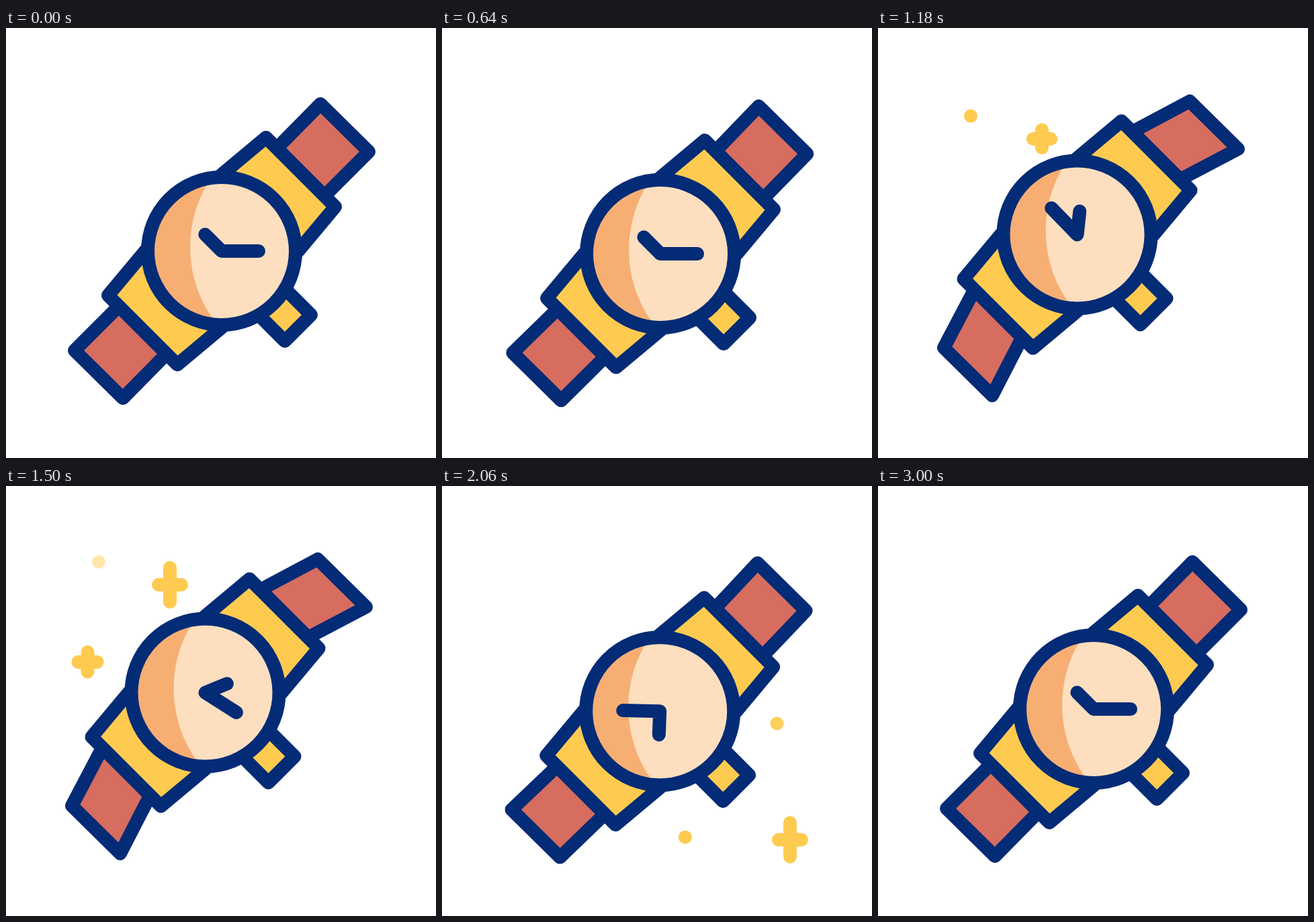
Recreate the animation shown at these times as an HTML page with a canvas. Size 640x640 px, loop 3.6 s.

```html
<!DOCTYPE html>
<html lang="en">
<head>
<meta charset="utf-8">
<title>Wrist watch</title>
<style>
html, body { margin: 0; width: 100%; height: 100%; overflow: hidden; background: #fff; }
canvas { display: block; }
</style>
</head>
<body>
<canvas id="stage" width="640" height="640"></canvas>
<script>
const ctx = document.getElementById('stage').getContext('2d');
const LOOP = 3600;
const NAVY = '#042b76', RED = '#d66d5f', YELLOW = '#fecb50', LIGHT = '#fddfbf', ORANGE = '#f7ae73';

// Smooth curve through [time, value] keys that never overshoots; flat at turning points.
function track(...keys) {
  const rise = keys.slice(1).map(([t, v], i) => (v - keys[i][1]) / (t - keys[i][0]));
  const slope = keys.map((_, i) => {
    const a = rise[i - 1] || 0, b = rise[i] || 0;
    return a * b > 0 ? 2 * a * b / (a + b) : 0;
  });
  return t => {
    if (t <= keys[0][0]) return keys[0][1];
    const i = keys.findIndex(k => k[0] > t) - 1;
    if (i < 0) return keys[keys.length - 1][1];
    const [t0, v0] = keys[i], [t1, v1] = keys[i + 1], d = t1 - t0, u = (t - t0) / d;
    const s = u * u * (3 - 2 * u);
    return v0 + (v1 - v0) * s + d * u * (1 - u) * (slope[i] * (1 - u) - slope[i + 1] * u);
  };
}

// Diagonal shifts, in px along both axes
const bodyShift = track([400, 0], [550, 8], [860, -16], [1040, -24.5], [1500, -24.5], [1800, 8.3], [1870, 12], [2160, 0]);
const tipShift = track([400, 0], [550, 4], [860, -0.5], [1100, -4], [1500, -4], [1800, 4.8], [1870, 6], [2160, 0]);
const crownShift = track([0, 0], [400, -9], [600, 0]);

// Hand angles in degrees
const hourTurn = track([640, -135], [860, -127], [1500, -22.4], [1800, 36], [2440, 165], [3000, 225]);
const minuteTurn = track([680, 0], [860, -17], [1500, -327], [1800, -607], [2440, -1253], [3000, -1440]);

// Sparkles, by age
const drift = track([0, 38], [160, 16], [460, 0], [680, -6]);
const armX = track([0, 0], [160, 14], [460, 17]);
const armY = track([0, 0], [160, 14.5], [460, 25.5]);
const plusFade = track([0, 0], [60, 1], [520, 1], [680, 0]);
const dotFade = track([0, 0], [60, 1], [400, 1], [520, 0]);
const sparkles = [
  { x: 244, y: 147, start: 1040, plus: true },
  { x: 138, y: 113, start: 1040 },
  { x: 121.5, y: 246, start: 1340, plus: true },
  { x: 498.5, y: 352, start: 1640 },
  { x: 518, y: 525, start: 1640, plus: true },
  { x: 362, y: 511, start: 1840 },
];

function line(points, color) {
  ctx.beginPath();
  points.forEach(p => ctx.lineTo(...p));
  ctx.strokeStyle = color;
  ctx.stroke();
}

function shape(points, fill) {
  ctx.beginPath();
  points.forEach(p => ctx.lineTo(...p));
  ctx.closePath();
  ctx.fillStyle = fill;
  ctx.strokeStyle = NAVY;
  ctx.fill();
  ctx.stroke();
}

function disc(x, y, r, fill) {
  ctx.beginPath();
  ctx.arc(x, y, r, 0, 2 * Math.PI);
  ctx.fillStyle = fill;
  ctx.fill();
}

function drawSparkle({ x, y, start, plus }, t) {
  const age = t - start;
  if (age <= 0) return;
  ctx.globalAlpha = (plus ? plusFade : dotFade)(age);
  const cy = y + drift(age);
  disc(x, cy, 10, YELLOW);
  if (plus) {
    const w = armX(age), h = armY(age);
    ctx.beginPath();
    ctx.moveTo(x - w, cy);
    ctx.lineTo(x + w, cy);
    ctx.moveTo(x, cy - h);
    ctx.lineTo(x, cy + h);
    ctx.strokeStyle = YELLOW;
    ctx.stroke();
  }
  ctx.globalAlpha = 1;
}

function drawFace() {
  ctx.save();
  disc(0, 0, 110, ORANGE);
  ctx.clip();
  disc(138, -6, 185, LIGHT);
  ctx.restore();
  ctx.beginPath();
  ctx.arc(0, 0, 110, 0, 2 * Math.PI);
  ctx.strokeStyle = NAVY;
  ctx.stroke();
}

function handEnd(length, degrees) {
  const a = degrees * Math.PI / 180;
  return [length * Math.cos(a), length * Math.sin(a)];
}

function draw(t) {
  ctx.fillStyle = '#fff';
  ctx.fillRect(0, 0, 640, 640);
  ctx.lineWidth = 20;
  ctx.lineCap = ctx.lineJoin = 'round';
  sparkles.forEach(s => drawSparkle(s, t));

  const body = bodyShift(t), bend = tipShift(t) - body, push = crownShift(t);
  ctx.save();
  ctx.translate(321 + body, 332 + body);
  for (const side of [1, -1]) {
    const at = (x, y, shift = 0) => [side * x + shift, side * y + shift];
    shape([at(82, -153), at(147, -219, bend), at(219, -148, bend), at(153, -82)], RED);
    shape([at(66, -169), at(169, -66), at(113, 1), at(-1, -113)], YELLOW);
  }
  shape([[78, 40], [133 + push, 95 + push], [94 + push, 134 + push], [39, 79]], YELLOW);
  drawFace();
  line([handEnd(35, hourTurn(t)), [0, 0], handEnd(55, minuteTurn(t))], NAVY);
  ctx.restore();
}

function frame() {
  draw(performance.now() % LOOP);
  requestAnimationFrame(frame);
}
frame();
</script>
</body>
</html>
```
